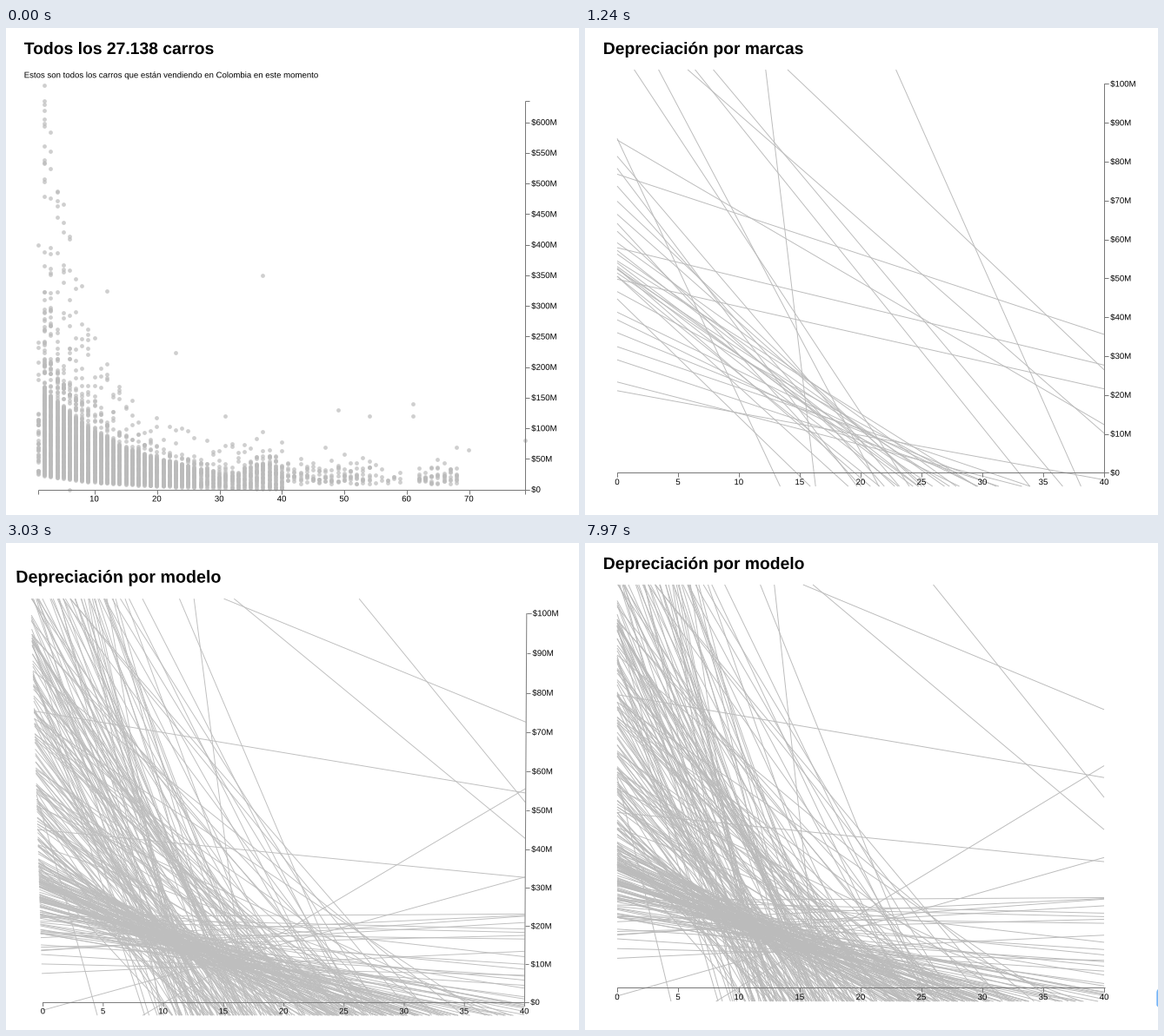
A matplotlib script for the animation above (8000 ms loop, 659 by 561 pixels).

```python
import numpy as np
import matplotlib.pyplot as plt
from matplotlib.animation import FuncAnimation
from matplotlib.collections import LineCollection
from matplotlib.patches import FancyBboxPatch, PathPatch
from matplotlib.path import Path
from matplotlib.textpath import TextPath

W, H, DPI = 659, 561, 64
PT = 72 / DPI
LOOP, STEP = 8000, 20
LEFT, RIGHT, TOP, BOTTOM = 37, 597, 48, 528
DATA, AXIS, INK = 0.735, 0.47, 0.0

# Moments at which the screen refreshes
KEYS = (0, 500, 640, 790, 940, 1090, 1240,
        2580, 2730, 2880, 3030, 3170, 3320, 4220, 7970)
STARTS, TURN = (352, 2501), 770

fig = plt.figure(figsize=(W / DPI, H / DPI), dpi=DPI, facecolor="white")
ax = fig.add_axes((0, 0, 1, 1))
ax.set(xlim=(0, W), ylim=(H, 0))
ax.axis("off")


# ---------- motion ----------
_s = np.linspace(0, 1, 400)


def bezier(a, b):
    return 3 * a * _s * (1 - _s) ** 2 + 3 * b * _s ** 2 * (1 - _s) + _s ** 3


EASE_X, EASE_Y = bezier(0.26, 0.44), bezier(0.86, 0.985)


def ease(u):
    return np.interp(u, EASE_X, EASE_Y)


def project(pts, d):
    """Tilt the slide plane; d > 0 is still to come, d < 0 already gone."""
    if d == 0:
        return pts
    shift, angle = 314 * d, np.radians(70 * d)
    x, y = pts[..., 0], pts[..., 1]
    w = y - 344.4 + shift
    s = 624 / (624 + w * np.sin(angle))
    return np.stack([513 + (x - 513) * s,
                     270 + (74.4 + shift + w * np.cos(angle)) * s], axis=-1)


def tint(level, opacity):
    return str(1 - (1 - level) * opacity)


# ---------- slide parts ----------
def label(text, x, y, size=9.6, weight="normal", center=False):
    path = TextPath((0, 0), text, size=size,
                    prop={"family": "Liberation Sans", "weight": weight})
    if center:
        box = path.get_extents()
        x -= (box.x0 + box.x1) / 2
    return Path(path.vertices * (1, -1) + (x, y), path.codes)


def heading(text):
    return label(text, 20.8, 30, 19.3, "bold")


def x_axis(y, ticks):
    segs = [((LEFT, y), (RIGHT + .5, y))]
    segs += [((x, y), (x, y + 4.8)) for x in [LEFT + .4, RIGHT + .4]]
    segs += [((x + .4, y), (x + .4, y + 4.8)) for x, _ in ticks]
    return segs, [label(str(v), x, y + 13.7, center=True) for x, v in ticks]


def y_axis(top, bottom, ticks):
    x = RIGHT + .4
    segs = [((x, top), (x, bottom))]
    segs += [((x, y), (x + 4.8, y)) for y in [top, bottom]]
    segs += [((x, y), (x + 4.8, y)) for y, _ in ticks]
    names = [f"${v}M" if v else "$0" for _, v in ticks]
    return segs, [label(n, 604.2, y + 3.1) for n, (y, _) in zip(names, ticks)]


def clip(v0, slope, squeeze=1):
    """Cut lines v0 + slope * years to the plot area, in pixels."""
    m = -4.48 * slope / 14 / squeeze
    b = 512 - 4.48 * v0 - m * LEFT
    xa, xb = (TOP - b) / m, (BOTTOM - b) / m
    lo = np.maximum(LEFT, np.minimum(xa, xb))
    hi = np.minimum(RIGHT, np.maximum(xa, xb))
    ok = lo < hi
    lo, hi, m, b = lo[ok], hi[ok], m[ok], b[ok]
    return np.stack([np.stack([lo, m * lo + b], -1),
                     np.stack([hi, m * hi + b], -1)], axis=1)


class Slide:
    def __init__(self, axes, texts, lines=None, dots=None):
        self.axis_pts = np.array([s for segs, _ in axes for s in segs])
        names = texts + [t for _, ts in axes for t in ts]
        self.text = Path.make_compound_path(*names)
        self.lines, self.dots = lines, dots
        self.art = []
        if lines is not None:
            self.line_art = self.keep(LineCollection([], zorder=1))
        if dots is not None:
            self.dot_art = ax.scatter(*dots.T, s=(4.8 * PT) ** 2, alpha=.7,
                                      linewidths=0, zorder=1)
            self.art.append(self.dot_art)
        self.axis_art = self.keep(LineCollection([], zorder=2))
        self.text_art = PathPatch(self.text, lw=0, zorder=3)
        ax.add_patch(self.text_art)
        self.art.append(self.text_art)

    def keep(self, coll):
        ax.add_collection(coll, autolim=False)
        self.art.append(coll)
        return coll

    def hide(self):
        for a in self.art:
            a.set_visible(False)

    def pose(self, d):
        for a in self.art:
            a.set_visible(True)
        opacity, thin = 1 - abs(d), 1 - .5 * abs(d)
        if self.lines is not None:
            self.line_art.set_segments(project(self.lines, d))
            self.line_art.set_color(tint(DATA, opacity))
            self.line_art.set_linewidth(.95 * PT * thin)
        if self.dots is not None:
            self.dot_art.set_offsets(project(self.dots, d))
            self.dot_art.set_facecolor(tint(DATA, opacity))
        self.axis_art.set_segments(project(self.axis_pts, d))
        self.axis_art.set_color(tint(AXIS, opacity))
        self.axis_art.set_linewidth(PT * thin)
        self.text_art.set_path(Path(project(self.text.vertices, d),
                                    self.text.codes))
        self.text_art.set_facecolor(tint(INK, opacity))


# ---------- data ----------
def car_dots():
    """Prices per age: a packed column, a thinning tail, a few rarities."""
    rng = np.random.default_rng(5)
    pts = [(2, 635), (2, 620), (1, 400), (12, 325), (37, 350), (23, 224),
           (31, 120), (49, 130), (54, 120), (61, 140), (61, 120),
           (70, 65), (79, 80), (6, 0)]

    def column(age, values):
        pts.extend((age, v) for v in values)

    column(1, rng.uniform(25, 125, 38))
    column(1, rng.uniform(166, 260, 5))
    for age in range(2, 41):
        low = 26 * np.exp(-age / 13)
        top = (12 + 220 * np.exp(-age / 14)
               + 28 * np.exp(-((age - 37.5) / 3) ** 2))
        tail = 40 + 430 * np.exp(-(age - 2) / 6)
        n = int(3 + 38 * np.exp(-(age - 2) / 5))
        column(age, np.arange(low, top * .82, 1.3 if age < 27 else 2.2))
        column(age, rng.uniform(low, top, int(top / 5)))
        column(age, top + tail * rng.random(n) ** 2.3)
    for age in range(41, 69):
        if age not in (60, 61):
            n = 3 if 54 < age < 60 else 9
            column(age, 8 + rng.gamma(1.7, 9, n).clip(0, 75))
    age, price = np.array(pts, float).T
    return np.stack([LEFT + (age - 1) * 560 / 78, 531.7 - .705 * price], -1)


def from_ends(ends):
    """Lines given by their values at ages 0 and 40."""
    a, b = np.array(ends, float).T
    return a, (b - a) / 40


def brand_lines():
    rng = np.random.default_rng(3)
    u = np.linspace(-1, 1, 29)
    v0 = 53 + 33 * u * abs(u) + rng.normal(0, .5, 29)
    zero = 21 + 13 * np.exp(-(v0 - 20) / 18) + rng.normal(0, 3.4, 29)
    a, sa = from_ends([(85.5, 12.3), (76.7, 35.5), (57.8, 27.6), (49.7, 21.5)])
    # lines from the top edge to the bottom edge, by age
    t0, t1 = np.array([(1.4, 24), (3.4, 21.5), (5.8, 45), (6.4, 33.9),
                       (7.9, 36.6), (12.2, 16.3), (14, 50.1),
                       (22.9, 38.1)]).T
    st = -107.14 / (t1 - t0)
    return (np.concatenate([v0, a, 103.57 - st * t0]),
            np.concatenate([-v0 / zero, sa, st]))


def model_lines():
    rng = np.random.default_rng(11)
    # cheap models meet near one point, pricey ones fan out
    cheap = rng.normal(28, 6, 85).clip(18)
    meet = (rng.normal(13, 1.3, 85) - cheap) / rng.normal(14, 1.5, 85)
    pricey = 30 + rng.gamma(1.5, 40, 175)
    zero = 17 * np.exp(rng.normal(0, .3, 175))
    ends = [(123.4, 72.5), (145.9, 42.7), (204.8, 52), (75.3, 54.4),
            (45, 32.6), (-19, 55.5), (-2.2, 32.7), (54, -456)]
    ends += [(v, rng.uniform(3, 18)) for v in np.linspace(7.5, 15, 4)]
    ends += [(rng.uniform(12, 27), rng.uniform(10, 31)) for _ in range(9)]
    a, sa = from_ends(ends)
    return (np.concatenate([cheap, pricey, a]),
            np.concatenate([meet, -pricey / zero, sa]))


# ---------- slides ----------
ages = x_axis(512.4, [(LEFT + 14 * v, v) for v in range(0, 41, 5)])
prices = y_axis(64.4, 512.4,
                [(512.4 - 4.48 * v, v) for v in range(0, 101, 10)])
models = model_lines()

SLIDES = [
    Slide([x_axis(531.7, [(LEFT + (v - 1) * 560 / 78, v)
                          for v in range(10, 71, 10)]),
           y_axis(84, 531.7, [(531.7 - .705 * v, v)
                              for v in range(0, 601, 50)])],
          [heading("Todos los 27.138 carros"),
           label("Estos son todos los carros que están vendiendo en "
                 "Colombia en este momento", 20.7, 57.3, 9.62)],
          dots=car_dots()),
    Slide([ages, prices], [heading("Depreciación por marcas")],
          clip(*brand_lines())),
    Slide([ages, prices], [heading("Depreciación por modelo")],
          clip(*models)),
]
# the last chart once its price axis is gone and its lines start to shrink
closing = Slide([ages], [heading("Depreciación por modelo")],
                clip(*models, squeeze=.98))
ring = FancyBboxPatch((658.3, 514), 30, 22, fc="none", ec="#74b4f7",
                      lw=2 * PT, zorder=4,
                      boxstyle="round,pad=0,rounding_size=4")
ax.add_patch(ring)


def update(i):
    key = max(k for k in KEYS if k <= i * STEP + STEP / 2)
    pos = sum(ease((key - s) / TURN) for s in STARTS)
    ring.set_visible(key >= 4220)
    for slide in SLIDES + [closing]:
        slide.hide()
    if key >= 7970:
        closing.pose(0)
        return []
    for n, slide in enumerate(SLIDES):
        if abs(n - pos) < .95:
            slide.pose(n - pos)
    return []


anim = FuncAnimation(fig, update, frames=LOOP // STEP, interval=STEP,
                     repeat=True, repeat_delay=0, blit=False)
plt.show()
```
